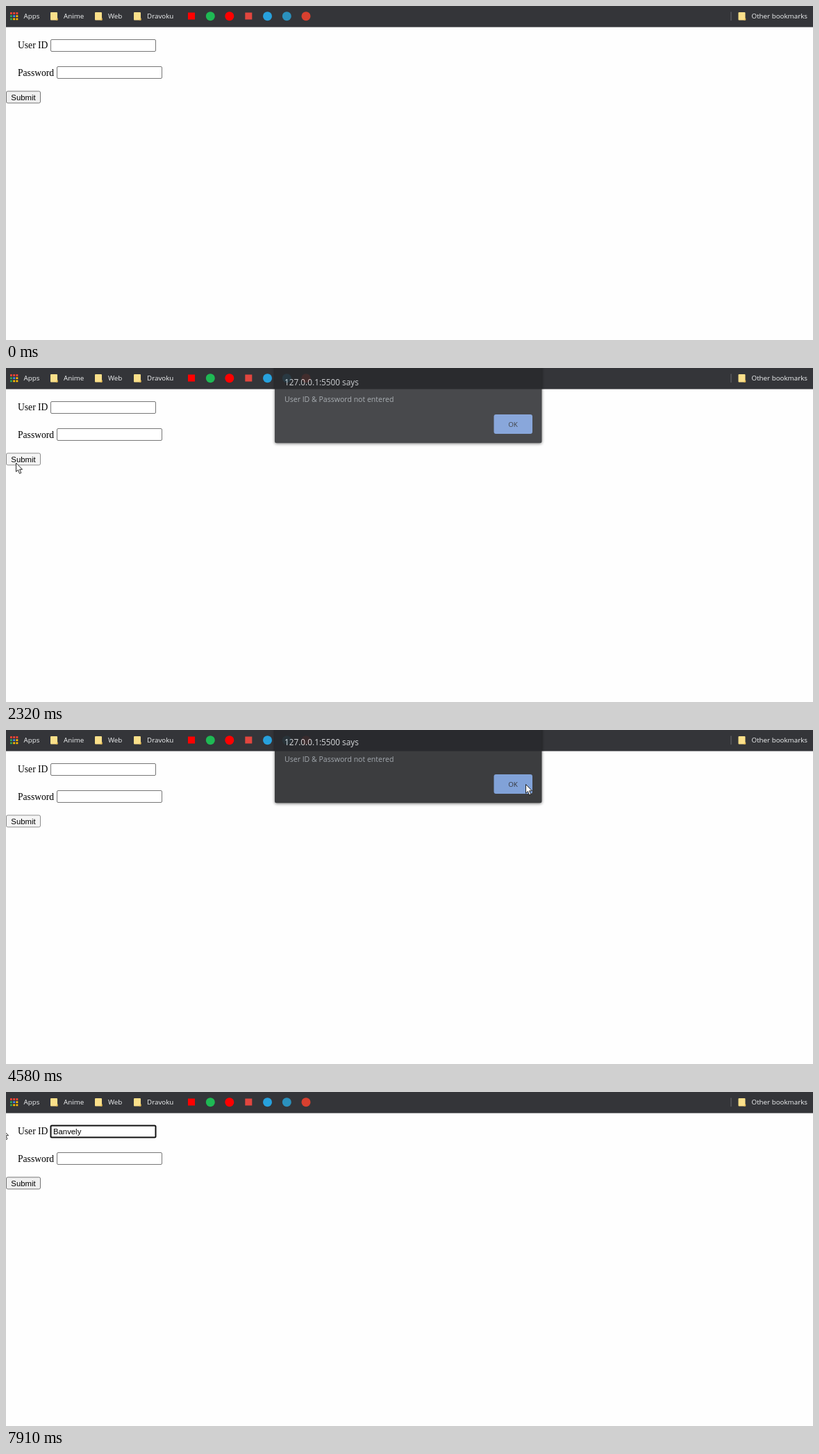
Animation of 1162x482 px, one loop 7990 ms. Source, as an HTML page:

```html
<!DOCTYPE html>
<html lang="en">
<head>
<meta charset="utf-8">
<title>Login form</title>
<style>
  html, body { margin: 0; width: 100%; height: 100%; overflow: hidden; background: #fefefe; }
  svg { display: block; width: 1162px; height: 482px; }
  text { white-space: pre; }
  .ui { font: 9.8px "Open Sans", "Noto Sans", sans-serif; fill: #f1f3f4; }
  .label { font: 13.6px "Liberation Serif", serif; fill: #000; }
  .control { font: 11.33px "Liberation Sans", sans-serif; fill: #000; }
  .field { fill: #fff; stroke: #767676; }
  .title { font-size: 11.8px; fill: #e8eaed; }
  .message { font-size: 10.55px; fill: #9aa0a6; }
  .panel { fill: #292a2d; filter: drop-shadow(0 1px 2px #0009); }
</style>
</head>
<body>
<svg viewBox="0 0 1162 482">
  <defs>
    <g id="folder">
      <path d="M0 1Q0 0 1 0H9Q10 0 10 1V11.5H1Q0 11.5 0 10.5Z" fill="#fbe08a"/>
      <path d="M7.5 11.5L10 8.5H10.7V11.5Z" fill="#e8bd55"/>
    </g>
  </defs>

  <rect width="1162" height="30.5" fill="#343539"/>
  <g id="apps"></g>
  <g id="bookmarks" class="ui"></g>
  <path d="M1044 8.5V21" stroke="#6b6d71"/>

  <text class="label" x="17" y="61">User ID</text>
  <rect id="user" class="field" x="64.5" y="48.5" width="151" height="17" rx="1.5"/>
  <text id="typed" class="control" x="68" y="61"></text>
  <rect id="caret" y="51" width="1" height="12.5"/>

  <text class="label" x="17" y="100.5">Password</text>
  <rect class="field" x="73.5" y="87.5" width="151" height="17" rx="1.5"/>

  <rect id="submit" x=".5" y="123" width="49" height="17" rx="2"/>
  <text class="control" x="25" y="135.7" text-anchor="middle">Submit</text>

  <g id="dialog" class="ui">
    <rect class="panel" x="387" y="-24" width="384.5" height="135.3" rx="2.5"/>
    <text class="title" x="401" y="28">127.0.0.1:5500 says</text>
    <text class="message" x="401" y="52">User ID &amp; Password not entered</text>
    <rect x="702.5" y="70" width="55.5" height="28" rx="3" fill="#7599d5"/>
    <text x="730" y="87.5" text-anchor="middle" style="fill:#202124">OK</text>
  </g>

  <g id="pointer">
    <path id="arrow" d="M.5 .5V13.2L3.4 10.5L5.5 15.8L7.8 14.8L5.6 9.8H9.5Z" fill="#fff" stroke="#111" stroke-width=".9"/>
    <path id="beam" d="M-3 -7.5H-1L0 -6.5L1 -7.5H3M0 -6.5V6.5M-3 7.5H-1L0 6.5L1 7.5H3" fill="none" stroke="#111"/>
  </g>
</svg>
<script>
const LOOP = 7990, TICK = 78;
const $ = id => document.getElementById(id);
const set = (el, attrs) => { for (const k in attrs) el.setAttribute(k, attrs[k]); };

const add = (parent, tag, attrs, text = '') => {
  const el = document.createElementNS('http://www.w3.org/2000/svg', tag);
  set(el, attrs);
  el.textContent = text;
  parent.append(el);
};

const [red, green, blue, yellow] = ['#ea4335', '#34a853', '#4285f4', '#fbbc05'];
[red, red, red, green, blue, yellow, green, yellow, yellow].forEach((fill, i) =>
  add($('apps'), 'rect', {
    x: 6 + i % 3 * 4.2, y: 9 + Math.floor(i / 3) * 4.2, width: 2.9, height: 2.9, rx: .5, fill
  }));

const bar = $('bookmarks');
add(bar, 'text', { x: 25.5, y: 18 }, 'Apps');
[[64, 'Anime'], [128, 'Web'], [184, 'Dravoku'], [1054.5, 'Other bookmarks']].forEach(([x, name]) => {
  add(bar, 'use', { href: '#folder', x, y: 9 });
  add(bar, 'text', { x: x + 19, y: 18 }, name);
});
const square = (x, fill) => add(bar, 'rect', { x: x - 5, y: 9.5, width: 10, height: 10, fill });
const circle = (x, fill) => add(bar, 'circle', { cx: x, cy: 14.7, r: 6.5, fill });
square(267, '#f00');
circle(294.3, '#1fb954');
circle(321.8, '#f00');
square(349.3, '#e2463f');
circle(376.5, '#27a1dd');
circle(404.3, '#2b91bd');
circle(432, '#d8402f');

// time, x, y of the pointer
const PATH = [
  [760, 968, 443], [920, 600, 270], [1080, 250, 150], [1230, 60, 114], [1400, 20, 135],
  [1540, 11, 146], [1690, 11, 146], [1780, 14, 136.5], [2700, 14, 136.5], [2715, 15, 136],
  [2866, 15, 136], [3022, 62, 106], [3250, 130, 77], [3660, 206, 57], [3720, 206, 57],
  [3802, 938, 76], [3950, 938, 76], [4270, 770, 80], [4350, 748, 78], [4680, 748, 78],
  [4750, 735, 84], [4820, 583, 97], [4900, 440, 88], [5000, 310, 74], [5128, 225, 63],
  [5284, 195, 50], [5420, 187, 54], [7705, 187, 54], [7800, 130, 53], [7858, 50, 54], [7910, -6, 53]
];
// time, opacity, vertical offset of the dialog
const DIALOG = [
  [2086, 0, -15], [2164, .02, -15], [2242, .45, -8], [2320, .85, -3], [2398, 1, 0],
  [4504, 1, 0], [4582, .91, -6], [4660, .4, -11], [4738, 0, -15]
];
const NAME = 'Banvely';
const KEY_TIMES = [6200, 6370, 6600, 6660, 6830, 6980, 7210];

function sample(keys, t) {
  const i = keys.findIndex(k => k[0] > t);
  if (i === 0) return keys[0].slice(1);
  if (i < 0) return keys[keys.length - 1].slice(1);
  const a = keys[i - 1], b = keys[i], p = (t - a[0]) / (b[0] - a[0]);
  return [1, 2].map(n => a[n] + (b[n] - a[n]) * p);
}

const show = (el, on) => { el.style.display = on ? '' : 'none'; };
const between = (v, lo, hi) => v >= lo && v < hi;

function draw(t) {
  const held = 760 + TICK * Math.floor((t - 730) / TICK);

  const [x, y] = sample(PATH, held);
  const overField = between(x, 64, 216) && between(y, 48, 66) && t > 5200;
  show($('pointer'), t >= 760);
  show($('arrow'), !overField);
  show($('beam'), overField);
  set($('pointer'), { transform: `translate(${x} ${y})` });

  const [opacity, dy] = sample(DIALOG, held);
  set($('dialog'), { opacity, transform: `translate(0 ${dy})` });

  const pressed = between(t, 1940, 4660);
  const hovered = between(t, 1400, 1940) && x < 50 && y < 141;
  set($('submit'), {
    fill: pressed ? '#f5f5f5' : hovered ? '#e5e5e5' : '#efefef',
    stroke: pressed ? '#8d8d8d' : hovered ? '#4f4f4f' : '#767676'
  });

  const focused = t >= 5410;
  $('user').style.stroke = focused ? '#101010' : '';
  $('user').style.strokeWidth = focused ? 2 : 1;
  const typed = $('typed');
  typed.textContent = NAME.slice(0, KEY_TIMES.filter(k => k <= t).length);
  const width = typed.textContent ? typed.getComputedTextLength() : 0;
  show($('caret'), between(t, 5410, 5900) || between(t, 6200, 7750));
  set($('caret'), { x: Math.round(68 + width) });
}

const start = performance.now();
function frame() {
  draw((performance.now() - start) % LOOP);
  requestAnimationFrame(frame);
}
frame();
</script>
</body>
</html>
```
